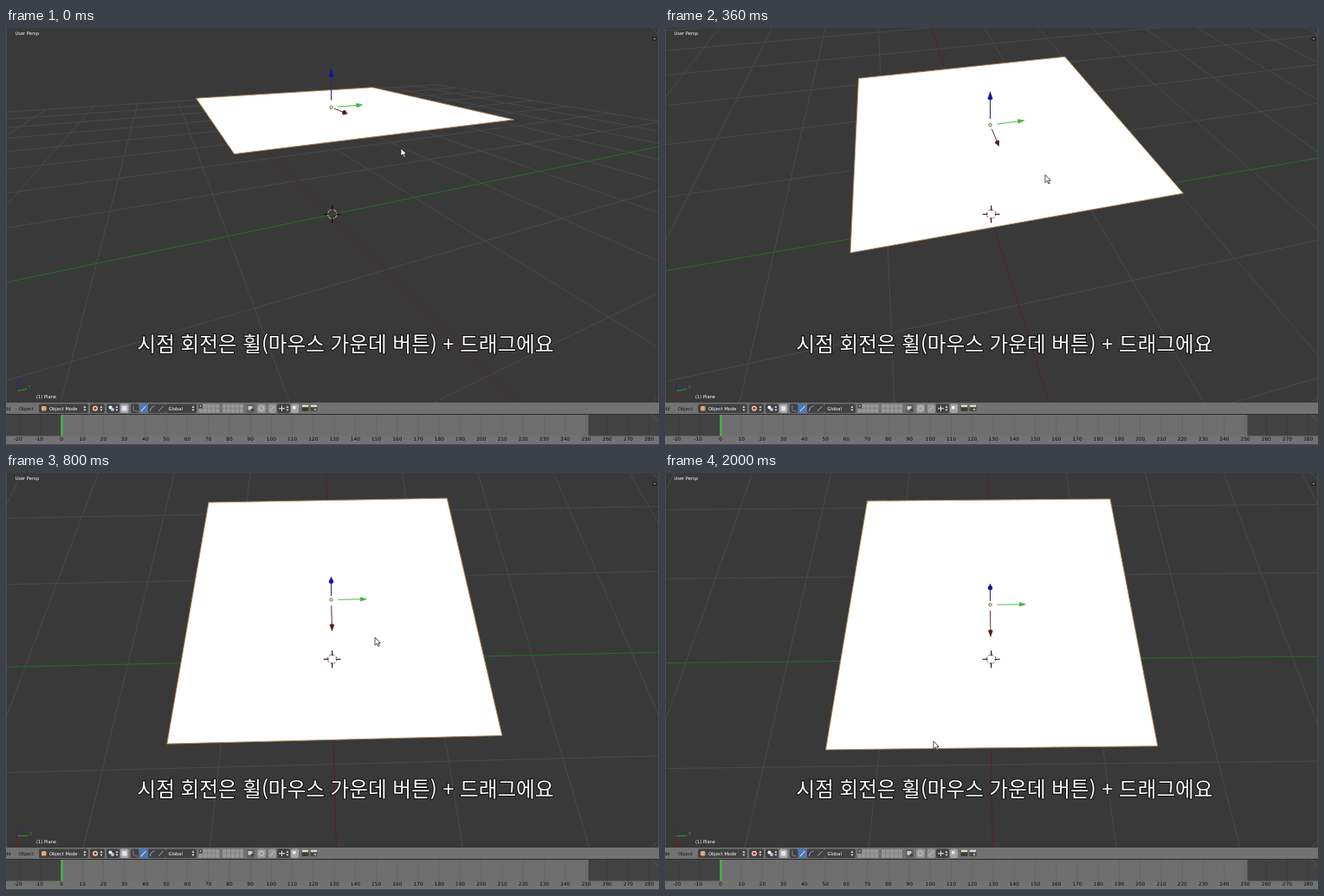
An HTML page for the animation above (2040 ms loop, 754 by 482 pixels).

```html
<!DOCTYPE html>
<html lang="ko">
<head>
<meta charset="utf-8">
<style>
html, body { margin: 0; width: 100%; height: 100%; overflow: hidden; background: #393939; }
svg { display: block; width: 754px; height: 482px; }
text { font-family: "DejaVu Sans", sans-serif; font-size: 5.15px; }
.caption { font: 23.6px "Noto Sans CJK KR", "Noto Sans CJK", sans-serif; fill: #fff; stroke: #111; stroke-width: 2.2px; stroke-linejoin: round; paint-order: stroke; }
</style>
</head>
<body>
<svg viewBox="0 0 754 482">
  <rect width="754" height="482" fill="#393939"/>
  <g id="scene"></g>
  <g fill="#fff">
    <text x="10.5" y="8.3">User Persp</text>
    <text x="35" y="428">(1) Plane</text>
  </g>
  <g id="miniAxes"></g>
  <path d="M.5 0V433" stroke="#4c4c4c"/>
  <path d="M753.5 0V433M746 0L753 7M746 433L753 426" stroke="#555" stroke-width=".7"/>
  <circle cx="749" cy="12.5" r="2.6" fill="#222"/>
  <path d="M747.4 12.5h3.2M749 10.9v3.2" stroke="#888" stroke-width=".7"/>
  <g id="panel"></g>
  <text class="caption" x="392" y="374.3" text-anchor="middle">시점 회전은 휠(마우스 가운데 버튼) + 드래그에요</text>
  <path id="mouse" d="M0 0V9L2.2 7L3.9 10.4L5.3 9.8L3.8 6.6H6.4Z" fill="#fff" stroke="#222" stroke-width=".8"/>
</svg>
<script>
const LOOP = 2040, STEP = 40;
const CX = 375.5, CY = 215.8, FOCAL = 398, DIST = 3.41, HEIGHT = 1.03, GRID = 8, NEAR = 0.1;
const AXES = [
  { dir: [1, 0, 0], line: '#583030', tip: '#5c1c1c', mini: '#8a1515', name: 'x' },
  { dir: [0, 1, 0], line: '#4cc04c', tip: '#44b844', mini: '#2aa02a', name: 'Y' },
  { dir: [0, 0, 1], line: '#2c2c60', tip: '#1414a8', mini: '#2424a0', name: 'z' }
];
// time, pitch, yaw, pointer x, pointer y
const KEYS = [
  [0, 27.2, -24.5, 456, 139],
  [80, 27.2, -24.5, 456, 139],
  [280, 40.9, -17.4, 444, 161],
  [440, 54.1, -9.2, 435, 176],
  [600, 59.6, -5.4, 432, 181],
  [800, 65.3, -1.42, 426, 190],
  [1120, 67.4, -0.75, 426, 190],
  [1200, 67.4, -0.75, 426, 190],
  [1480, 67.6, -0.62, 426, 190],
  [1880, 67.6, -0.62, 426, 190],
  [2000, 67.6, -0.62, 310, 310]
];
const $ = id => document.getElementById(id);
const line = (a, b, color, width = 1) =>
  `<path d="M${a}L${b}" stroke="${color}" stroke-width="${width}" fill="none"/>`;
const rect = (x, y, w, h, fill, r = 0) =>
  `<rect x="${x}" y="${y}" width="${w}" height="${h}" rx="${r}" fill="${fill}"/>`;
const label = (x, y, s, fill, more = '') => `<text x="${x}" y="${y}" fill="${fill}" ${more}>${s}</text>`;

// Monotone cubic through the keys
function sample(t, col) {
  const slope = i => (KEYS[i + 1][col] - KEYS[i][col]) / (KEYS[i + 1][0] - KEYS[i][0]);
  const last = KEYS.length - 1;
  const tangent = i => {
    if (i === 0) return slope(0);
    if (i === last) return slope(last - 1);
    const a = slope(i - 1), b = slope(i);
    return a * b > 0 ? 2 * a * b / (a + b) : 0;
  };
  if (t >= KEYS[last][0]) return KEYS[last][col];
  const i = KEYS.findIndex((k, n) => t < KEYS[n + 1][0]);
  const span = KEYS[i + 1][0] - KEYS[i][0], u = (t - KEYS[i][0]) / span, v = 1 - u;
  return KEYS[i][col] * (1 + 2 * u) * v * v + KEYS[i + 1][col] * u * u * (3 - 2 * u)
    + span * u * v * (tangent(i) * v - tangent(i + 1) * u);
}

function makeCamera(pitch, yaw) {
  const rad = Math.PI / 180;
  const s = Math.sin(pitch * rad), c = Math.cos(pitch * rad);
  const sy = Math.sin(yaw * rad), cy = Math.cos(yaw * rad);
  const view = ([x, y, z]) => {
    const w = x * cy + y * sy;
    return [y * cy - x * sy, z * c - w * s, w * c + z * s];
  };
  const depth = p => DIST - view(p)[2];
  const project = p => {
    const [x, y, n] = view(p), k = FOCAL / (DIST - n);
    return [CX + x * k, CY - y * k];
  };
  const segment = (a, b, color) => {
    const da = depth(a), db = depth(b);
    if (da < NEAR && db < NEAR) return '';
    const cut = (p, q, dp, dq) => dp >= NEAR ? p : p.map((v, i) => v + (q[i] - v) * (NEAR - dp) / (dq - dp));
    return line(project(cut(a, b, da, db)), project(cut(b, a, db, da)), color);
  };
  return { view, depth, project, segment };
}

function drawArrow(cam, axis, size) {
  const at = k => cam.project(axis.dir.map((v, i) => v * k * size + (i === 2 ? HEIGHT : 0)));
  const base = at(.8), tip = at(1), r = 2.7;
  const angle = Math.atan2(tip[1] - base[1], tip[0] - base[0]);
  const nx = -Math.sin(angle) * r, ny = Math.cos(angle) * r;
  const flat = r * Math.abs(cam.view(axis.dir)[2]);
  return line(at(.19), base, axis.line)
    + `<path d="M${base[0] + nx} ${base[1] + ny}L${tip}L${base[0] - nx} ${base[1] - ny}Z" fill="${axis.tip}"/>`
    + `<ellipse rx="${flat}" ry="${r}" transform="translate(${base}) rotate(${angle * 180 / Math.PI})" fill="${axis.tip}"/>`;
}

function drawScene(cam) {
  let out = '';
  for (let i = -GRID; i <= GRID; i++) {
    if (!i) continue;
    out += cam.segment([i, -GRID, 0], [i, GRID, 0], '#484848')
      + cam.segment([-GRID, i, 0], [GRID, i, 0], '#484848');
  }
  out += cam.segment([-GRID, 0, 0], [GRID, 0, 0], '#50232a');
  out += cam.segment([0, -GRID, 0], [0, GRID, 0], '#256a28');

  const corners = [[-1, -1], [-1, 1], [1, 1], [1, -1]].map(([x, y]) => cam.project([x, y, HEIGHT]));
  out += `<path d="M${corners.join('L')}Z" fill="#fff" stroke="#b48a58" stroke-width=".9"/>`;

  const center = [0, 0, HEIGHT], size = 42 * cam.depth(center) / FOCAL;
  out += AXES.map(a => drawArrow(cam, a, size)).join('');
  const [x, y] = cam.project(center);
  out += `<circle cx="${x}" cy="${y}" r="1.7" fill="#ffe6c0" stroke="#5a4630" stroke-width=".8"/>`;

  return out + `<g transform="translate(376.7 215.2)" fill="none">
    <circle r="5.2" stroke="#f0ece4" stroke-width=".9"/>
    <circle r="5.2" stroke="#8a3838" stroke-dasharray="2.04"/>
    <path d="M-10 0H-4M4 0H10M0-10V-4M0 4V10" stroke="#000" stroke-width="1.1"/></g>`;
}

function drawMiniAxes(cam) {
  return AXES.map(a => {
    const [x, y] = cam.view(a.dir), end = [13 + 12.5 * x, 419.5 - 12.5 * y];
    return line([13, 419.5], end, a.mini)
      + label(end[0] + 1.5, end[1] - .3, a.name, a.mini);
  }).join('');
}

function drawPanel() {
  const dark = '#414141', pale = '#969696';
  const arrows = x => `<path d="M${x} 439l1.5-2.4 1.5 2.4zM${x} 440.6l1.5 2.4 1.5-2.4z" fill="#ddd"/>`;
  const dot = (x, y, r, fill) => `<circle cx="${x}" cy="${y}" r="${r}" fill="${fill}"/>`;
  let out = rect(0, 433, 754, 14, '#727272') + rect(0, 446, 754, 1, '#2c2c2c');
  out += label(-1, 441.8, 'dd', '#111') + label(15, 441.8, 'Object', '#111');
  out += rect(38, 434.5, 57, 10.5, dark, 2) + rect(41, 437, 5.5, 5.5, '#e0a878', 1.5)
    + label(50, 441.8, 'Object Mode', '#fff') + arrows(89.5);
  out += rect(97, 434.5, 17, 10.5, dark, 2) + dot(103, 439.7, 3, '#eed0c4') + dot(103, 439.7, 1.6, '#b03020') + arrows(108.5);
  out += rect(116, 434.5, 15, 10.5, dark, 2) + dot(120.5, 438.5, 2, '#fff') + dot(123, 441, 2, '#a9c6ec') + arrows(126.5);
  out += rect(132, 434.5, 9.5, 10.5, '#a8a8a8', 2) + rect(134, 437, 5.5, 5.5, '#dfe4ee', 1);
  out += rect(144, 434.5, 9.5, 10.5, dark, 2) + line([147, 436.5], [147, 442], '#6a8ae0') + line([147, 442], [152, 443], '#d06050');
  out += rect(154, 434.5, 9.5, 10.5, '#4a78bc', 2) + line([156, 443], [161.5, 437], '#fff');
  out += rect(164, 434.5, 20, 10.5, dark, 2)
    + `<path d="M166.5 443q0-5 5-6M176 443l5.5-6" fill="none" stroke="#88a8d8"/>`;
  out += rect(184, 434.5, 36, 10.5, dark, 2) + label(187.5, 441.8, 'Global', '#fff') + arrows(214.5);
  for (const x0 of [222.5, 250])
    for (let i = 0; i < 10; i++)
      out += rect(x0 + i % 5 * 4.9, 434.7 + (i > 4 ? 5.2 : 0), 4.4, 4.8, i || x0 > 230 ? pale : '#484848', .6);
  out += dot(224.7, 437, 1, '#e8a850');
  out += rect(278, 435, 9, 10, '#606060', 2) + rect(279.5, 437, 5, 4.5, '#ccc', 1) + dot(284.5, 441.5, 1.8, '#444');
  out += rect(290, 434.5, 10, 10.5, pale, 2) + `<circle cx="295" cy="439.7" r="2.7" fill="none" stroke="#ccc"/>`;
  out += rect(303, 434.5, 9, 10.5, pale, 2) + line([305, 442.5], [310, 437], '#c4c4c4');
  out += rect(313, 434.5, 15, 10.5, dark, 2) + line([315, 439.7], [322, 439.7], '#9cc4f0', 1.4) + line([318.5, 436.5], [318.5, 443], '#ddd') + arrows(323.5);
  out += rect(329, 434.5, 9, 10.5, '#a4a4a4', 2) + rect(331, 437, 3.5, 3.5, '#eee');
  out += rect(341.5, 437, 8, 6, '#3c3c3c', 1) + rect(342, 435.8, 7, 2.4, '#e5e2b0')
    + rect(351.5, 437, 8, 6, '#444', 1) + rect(352, 435.8, 7, 2.4, '#d8d8d8') + dot(357, 441, 1.3, '#98c080');

  out += rect(0, 447, 754, 25, '#424242') + rect(64, 447, 608.5, 25, '#6e6e6e') + rect(0, 471.5, 754, 10.5, '#727272');
  for (let n = -20; n <= 280; n += 10) {
    const x = 64 + n * 2.424;
    out += line([x, 447], [x, 471.5], n < 0 || n > 250 ? '#3b3b3b' : '#656565', .8)
      + label(x - (n < 0 ? 1.5 : 0), 477.2, n, '#0c0c0c', 'text-anchor="middle" style="font-size:5.8px"');
  }
  return out + rect(63.4, 447, 2.2, 24.5, '#3fc03f') + rect(0, 481, 754, 1, '#4a4a4a')
    + line([746, 447], [753, 454], '#606060', .7);
}

function render(t) {
  const cam = makeCamera(sample(t, 1), sample(t, 2));
  $('scene').innerHTML = drawScene(cam);
  $('miniAxes').innerHTML = drawMiniAxes(cam);
  $('mouse').setAttribute('transform', `translate(${sample(t, 3)} ${sample(t, 4)})`);
}

$('panel').innerHTML = drawPanel();
const start = performance.now();
let shown = -1;
function tick() {
  const t = Math.floor((performance.now() - start) % LOOP / STEP) * STEP;
  if (t !== shown) render(shown = t);
  requestAnimationFrame(tick);
}
tick();
</script>
</body>
</html>
```
